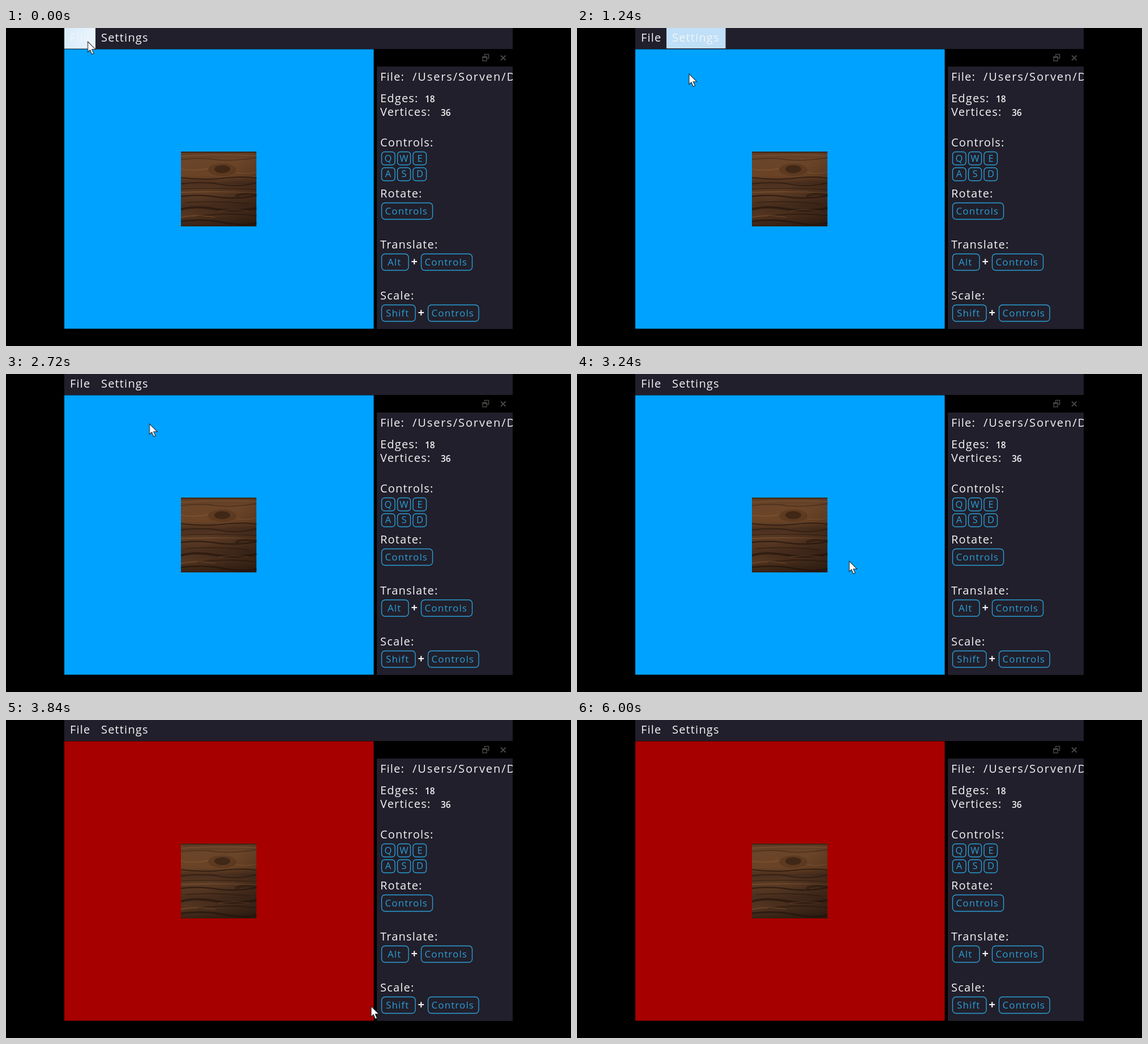
An HTML page that plays this animation: 998x561 px, repeating every 6040 ms.

```html
<!DOCTYPE html>
<html lang="en">
<head>
<meta charset="utf-8">
<title>Model viewer</title>
<style>
  html, body { margin: 0; width: 100%; height: 100%; overflow: hidden; background: #000; }
  svg { display: block; width: 998px; height: 561px; }
  text { font: 20px "Open Sans", "Noto Sans", sans-serif; letter-spacing: 1.2px; fill: #f4f4f6; }
  .path { letter-spacing: 1.9px; }
  .num { font-size: 15.5px; font-weight: 600; letter-spacing: 0; }
  .plus { font-size: 20px; font-weight: 700; letter-spacing: 0; }
  .keys rect { fill: none; stroke: #2a9fd6; stroke-width: 1.4; }
  .keys text { font-size: 17px; letter-spacing: 1.1px; fill: #2a9fd6; }
  .keys .cap { font-size: 16.5px; letter-spacing: 0; text-anchor: middle; }
  .icon { fill: none; stroke: #484743; stroke-width: 1.5; }
  .grain path { fill: none; stroke-linecap: round; }

  .view { animation: view 6040ms step-end infinite; }
  .hot-file { animation: hot-file 6040ms step-end infinite; }
  .hot-settings { animation: hot-settings 6040ms step-end infinite; }
  .cursor { animation: cursor 6040ms ease-in-out infinite; }

  @keyframes view { 0% { fill: #00a2ff; } 63.5% { fill: #a60000; } }
  @keyframes hot-file { 0% { opacity: 1; } 6% { opacity: 0; } }
  @keyframes hot-settings { 0% { opacity: 0; } 6% { opacity: 1; } 22% { opacity: 0; } }
  @keyframes cursor {
    0%, 2% { transform: translate(144.5px, 24px); }
    8%, 11% { transform: translate(180px, 20px); }
    18%, 23% { transform: translate(198px, 81px); }
    33%, 46% { transform: translate(253.5px, 88px); }
    60%, 71% { transform: translate(645px, 505px); }
    83%, 85% { transform: translate(885px, 358px); }
    88%, 100% { transform: translate(915px, 345px); }
  }
</style>
</head>
<body>
<svg viewBox="0 0 998 561">
  <defs>
    <linearGradient id="wood" x2="0" y2="1">
      <stop offset="0" stop-color="#5a3a24"/>
      <stop offset=".12" stop-color="#6b4529"/>
      <stop offset=".32" stop-color="#6a4326"/>
      <stop offset=".42" stop-color="#4a2f1e"/>
      <stop offset=".55" stop-color="#5c3b24"/>
      <stop offset=".72" stop-color="#4a2f1e"/>
      <stop offset=".85" stop-color="#553621"/>
      <stop offset="1" stop-color="#3a2516"/>
    </linearGradient>
    <linearGradient id="shade" x2="1" y2="1">
      <stop offset=".45" stop-color="#1c100a" stop-opacity="0"/>
      <stop offset="1" stop-color="#1c100a" stop-opacity=".6"/>
    </linearGradient>
    <linearGradient id="hot">
      <stop offset="0" stop-color="#d9ecfb"/>
      <stop offset="1" stop-color="#eaf5fd"/>
    </linearGradient>
    <clipPath id="app"><rect x="103" width="792" height="561"/></clipPath>
    <clipPath id="plank"><rect width="133.500" height="132"/></clipPath>
  </defs>

  <rect width="998" height="561"/>
  <g clip-path="url(#app)">
    <rect x="103" width="792" height="37" fill="#221f2c"/>
    <rect class="hot-file" x="103" width="55" height="36.5" fill="url(#hot)"/>
    <rect class="hot-settings" x="158" width="104.5" height="36" fill="#bfe0f8"/>
    <text x="113" y="24">File</text>
    <text x="168" y="24">Settings</text>

    <rect class="view" x="103" y="37.5" width="546.5" height="493"/>
    <g class="grain" transform="translate(309 218)" clip-path="url(#plank)">
      <rect width="133.500" height="132" fill="url(#wood)"/>
      <g stroke="#25160d" stroke-width="1.6">
        <path d="M0 1H133" stroke-width="2" opacity=".5"/>
        <path d="M0 14Q35 10 60 14T133 11" opacity=".4"/>
        <path d="M0 46Q40 51 75 47T133 47" stroke-width="2" opacity=".7"/>
        <path d="M0 57Q40 52 70 58T133 55" opacity=".7"/>
        <path d="M0 66Q50 63 133 67" opacity=".5"/>
        <path d="M0 79Q30 75 62 80T133 78" stroke-width="2.5" opacity=".7"/>
        <path d="M8 90Q60 86 120 92" opacity=".5"/>
        <path d="M0 102Q24 95 58 101T133 100" stroke-width="4" opacity=".7"/>
        <path d="M30 114Q80 107 133 113" stroke-width="2.5" opacity=".5"/>
        <path d="M0 123Q40 118 75 125T133 126" stroke-width="3" opacity=".7"/>
        <path d="M98 78Q112 72 133 76" stroke-width="5" opacity=".5"/>
      </g>
      <g stroke="#8a5c38" stroke-width="1.5" opacity=".6">
        <path d="M0 8Q60 4 133 7"/>
        <path d="M0 31Q25 35 48 30"/>
        <path d="M98 37Q115 41 133 36"/>
        <path d="M0 72Q70 69 133 73"/>
        <path d="M68 105Q95 100 120 105"/>
        <path d="M0 116Q28 110 60 116"/>
      </g>
      <ellipse cx="73" cy="32" rx="25" ry="11" fill="#4a2c17" opacity=".4"/>
      <ellipse cx="73" cy="31" rx="14" ry="7" fill="#342012" opacity=".7"/>
      <rect width="133.500" height="132" fill="url(#shade)"/>
    </g>

    <rect x="655" y="68" width="240" height="463" fill="#211f2b"/>
    <g class="icon">
      <path d="M845.5 49V46.5H852.5V53.5H850M842 50.5H849V58H842ZM842 52H849"/>
      <path d="M874 48.5L882.5 57M882.5 48.5L874 57" stroke-width="2"/>
    </g>

    <text x="661" y="93">File:</text>
    <text class="path" x="718" y="93">/Users/Sorven/D</text>
    <text x="661" y="131">Edges:</text>
    <text class="num" x="740" y="131">18</text>
    <text x="661" y="155">Vertices:</text>
    <text class="num" x="768" y="155">36</text>
    <text x="661" y="209">Controls:</text>
    <text x="661" y="299">Rotate:</text>
    <text x="661" y="389">Translate:</text>
    <text x="661" y="479">Scale:</text>
    <text class="plus" x="715.5" y="419">+</text>
    <text class="plus" x="727.5" y="509">+</text>

    <g class="keys">
      <rect x="663.5" y="218.5" width="23.5" height="23" rx="5"/>
      <rect x="691.5" y="218.5" width="23" height="23" rx="5"/>
      <rect x="719" y="218.5" width="23.5" height="23" rx="5"/>
      <rect x="663.5" y="246.5" width="23.5" height="23" rx="5"/>
      <rect x="691.5" y="246.5" width="23" height="23" rx="5"/>
      <rect x="719" y="246.5" width="23.5" height="23" rx="5"/>
      <text class="cap" x="675" y="235.5">Q</text>
      <text class="cap" x="703" y="235.5">W</text>
      <text class="cap" x="731" y="235.5">E</text>
      <text class="cap" x="675" y="263">A</text>
      <text class="cap" x="703" y="263">S</text>
      <text class="cap" x="731" y="263">D</text>

      <rect x="663.5" y="308.5" width="90" height="29" rx="6"/>
      <text x="669.5" y="329">Controls</text>

      <rect x="663.5" y="398.5" width="47.5" height="29" rx="6"/>
      <text x="674" y="419">Alt</text>
      <rect x="733.5" y="398.5" width="90" height="29" rx="6"/>
      <text x="739.5" y="419">Controls</text>

      <rect x="663.5" y="488.5" width="59.5" height="29" rx="6"/>
      <text x="671" y="509">Shift</text>
      <rect x="745.5" y="488.5" width="89.5" height="29" rx="6"/>
      <text x="751.5" y="509">Controls</text>
    </g>

    <path class="cursor" d="M0 0V18.5L4 14.8L7.2 22.3L10.5 21L7.3 13.7H13.5Z"
      fill="#fff" stroke="#222" stroke-width="1.1"/>
  </g>
</svg>
</body>
</html>
```
